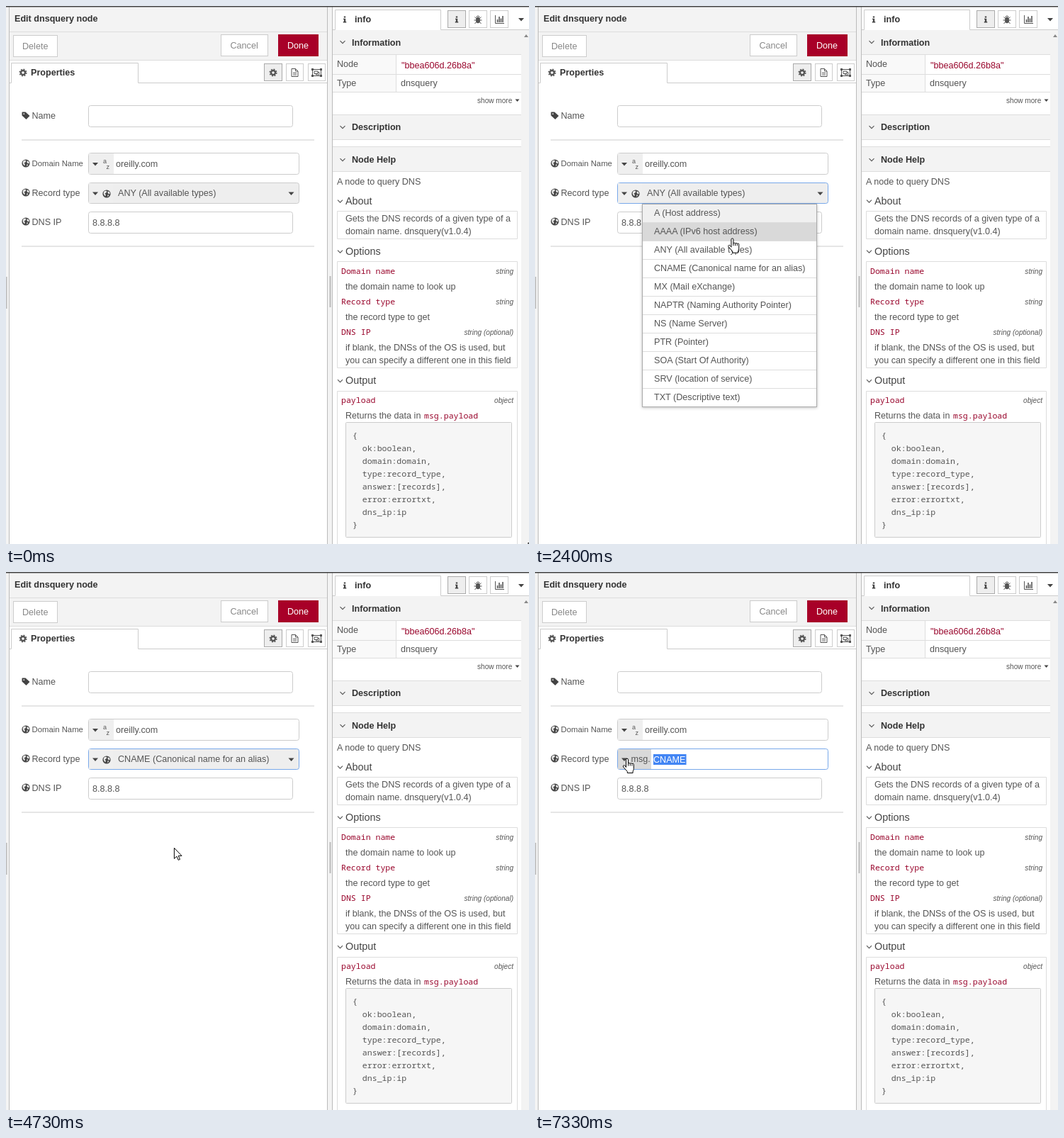
An HTML page for the animation above (8000 ms loop, 738 by 759 pixels).

```html
<!DOCTYPE html>
<html lang="en">
<head>
<meta charset="utf-8">
<title>Edit dnsquery node</title>
<style>
html, body { margin: 0; width: 100%; height: 100%; overflow: hidden; background: #fff; }
body { position: relative; font: 12.6px "Liberation Sans", Arial, sans-serif; color: #555; }
svg.layer { position: absolute; left: 0; top: 0; pointer-events: none; }
text { fill: #555; white-space: pre; }
.b { font-weight: bold; fill: #333; }
.h { font-size: 14.4px; fill: #444; }
.i { font-size: 10.08px; font-style: italic; text-anchor: end; }
.m { font: 11.55px "Noto Sans Mono", monospace; }
.red { fill: #99062c; }
.line { stroke: #ddd; fill: none; }
.rule { stroke: #ccc; fill: none; }
.bar { fill: #f3f3f3; }
.box { fill: #fff; stroke: #ccc; }
.on { fill: #eee; stroke: #aaa; }
.chev { fill: none; stroke: #555; stroke-width: 1.1; }
.menu { position: absolute; top: 279px; box-sizing: border-box; overflow: hidden; background: #fff;
  border: 1px solid #aaa; box-shadow: 0 1px 4px rgba(0,0,0,.25); }
.menu div { height: 25px; line-height: 25px; padding-left: 16px; border-bottom: 1px solid #ddd; white-space: nowrap; }
.menu .tall { height: 27px; line-height: 27px; }
.menu .icon { padding-left: 5px; }
.menu .icon > :first-child { display: inline-block; width: 16px; height: 12px; line-height: 12px; vertical-align: -2px; }
.menu .icon > b { vertical-align: 0; }
.menu .first { background: #f0f0f0; }
.menu .hover { background: #d9d9d9; }
</style>
</head>
<body>
<svg class="layer" width="738" height="759">
  <defs>
    <g id="globe">
      <circle r="5.6" fill="#444"/>
      <path d="M-3.6-3.4L-1-4.6 .4-3.2-.8-1.4-2.6-.4-1.2 1-1.8 3.6-3.6 1.6-4.4-.8ZM1.6-3.8L4.2-2.4 4.6 0 3 .2 1.6-1.2ZM1.2 1.4L3.4 1.6 1.6 4.4Z" fill="#eee"/>
    </g>
    <path id="caret" d="M-4-2H4L0 2.4Z" fill="#444"/>
    <path id="chev" class="chev" d="M-3.5-1.8L0 1.7 3.5-1.8"/>
    <g id="gear" fill="none" stroke="#555">
      <circle r="3" stroke-width="2.4"/>
      <circle r="4.7" stroke-width="1.7" stroke-dasharray="1.85 1.84"/>
    </g>
    <g id="info" fill="#444"><path d="M-1.2-4.5H1.2V-2.5H-1.2ZM-2-1.3H1.2V3H2.2V4.5H-2.2V3H-1.2V0H-2Z"/></g>
  </defs>

  <!-- editor frame -->
  <rect class="bar" width="5" height="759"/>
  <rect class="bar" x="5" width="448" height="77"/>
  <rect class="bar" x="453" width="8" height="759"/>
  <path d="M4.5 0V759M453.5 0V759M460.5 0V759" stroke="#bbb"/>
  <path d="M.5 382V427M457.5 381V425" stroke="#bbb" stroke-width="2"/>
  <path class="line" d="M5 36.5H453M5 76.5H453"/>
  <path d="M5 108.5H7.5V80.5H186.5V108.5H453" class="rule"/>
  <text class="b" x="12" y="22">Edit dnsquery node</text>
  <rect class="box" x="10.5" y="41.5" width="62" height="30"/>
  <rect class="box" x="303.5" y="40.5" width="66" height="30"/>
  <rect x="384" y="40" width="57" height="31" fill="#a80028"/>
  <text x="23" y="61" style="fill:#888">Delete</text>
  <text x="316.5" y="60" style="fill:#888">Cancel</text>
  <text x="397" y="60" style="fill:#fff">Done</text>
  <use href="#gear" x="24" y="94"/>
  <text class="b" x="35" y="98">Properties</text>
  <rect class="on" x="364.5" y="81.5" width="25" height="24"/>
  <rect class="box" x="395.5" y="81.5" width="24" height="24"/>
  <rect class="box" x="426.5" y="81.5" width="24" height="24"/>
  <use href="#gear" x="377" y="94"/>
  <path d="M403 88.5H408.5L412 92V99.5H403ZM408.5 88.5V92H412M405 94.5H410M405 97H410" fill="none" stroke="#555"/>
  <path d="M432.5 89.5H444.5V98.5H432.5ZM435 92H440V95.5H435ZM437.5 95.5V97H442V93.5H440" fill="none" stroke="#555"/>
  <path d="M431 88h3v3h-3zM443 88h3v3h-3zM431 97h3v3h-3zM443 97h3v3h-3z" fill="#555"/>

  <!-- form -->
  <path d="M22.5 150V154.5L28.5 160 33.5 155 27.5 149.5H23ZM24.5 151.5h1.6v1.6h-1.6Z" fill="#444" fill-rule="evenodd"/>
  <text x="36.5" y="159">Name</text>
  <rect class="box" x="116.5" y="140.5" width="288" height="30" rx="3"/>
  <path class="rule" d="M22 189H435M22 339H435"/>
  <use href="#globe" x="28" y="222"/><use href="#globe" x="28" y="263"/><use href="#globe" x="28" y="304"/>
  <text x="36.5" y="226" style="font-size:11.34px">Domain Name</text>
  <text x="36.5" y="268">Record type</text>
  <text x="36.5" y="309">DNS IP</text>
  <rect class="box" x="116.5" y="207.5" width="297" height="30" rx="3"/>
  <path d="M117 208H152V237H117Z" fill="#efefef"/>
  <use href="#caret" x="126" y="223"/>
  <text x="137" y="221.5" style="font-size:9px">a</text>
  <text x="141.5" y="230" style="font-size:9px">z</text>
  <text x="155" y="227">oreilly.com</text>
  <rect class="box" x="116.5" y="290.5" width="288" height="30" rx="3"/>
  <text x="122" y="310">8.8.8.8</text>

  <!-- record type control -->
  <rect id="field" x="116.5" y="249.5" width="297" height="29" rx="3"/>
  <rect id="left" x="117" y="250" height="28"/>
  <rect id="right" x="392" y="250" width="21" height="28" fill="#d9d9d9"/>
  <use href="#caret" x="126" y="264.5"/>
  <g id="chosen">
    <use href="#globe" x="142" y="265"/>
    <use href="#caret" x="402.5" y="264.5"/>
    <text id="value" x="158" y="268"></text>
  </g>
  <g id="typed">
    <text x="135.5" y="268">msg.</text>
    <text id="word" x="167" y="269">CNAME</text>
    <clipPath id="cut"><rect id="cutBox" y="257" height="15"/></clipPath>
    <g clip-path="url(#cut)">
      <rect x="160" y="257" width="60" height="15" fill="#4285f4"/>
      <text x="167" y="269" style="fill:#fff">CNAME</text>
    </g>
    <path id="bar" d="M213.5 257V272" stroke="#222"/>
  </g>

  <!-- sidebar -->
  <path class="rule" d="M461 33.5H464.5V5.5H613.5V33.5H738"/>
  <use href="#info" x="478" y="19"/>
  <text class="b" x="492" y="23">info</text>
  <rect class="on" x="623.5" y="6.5" width="25" height="24"/>
  <rect class="box" x="653.5" y="6.5" width="25" height="24"/>
  <rect class="box" x="683.5" y="6.5" width="25" height="24"/>
  <use href="#info" x="636" y="19"/>
  <ellipse cx="666" cy="20" rx="3" ry="4.3" fill="#555"/>
  <path d="M664 16a2 2 0 0 1 4 0M660.5 20H671.5M661.5 15.5L664 18M670.5 15.5L668 18M661.5 25L664 22M670.5 25L668 22" fill="none" stroke="#555"/>
  <path d="M690.5 13V24.5H703" fill="none" stroke="#555"/>
  <path d="M693.5 23V19M696 23V15M698.5 23V17.5M701 23V14" stroke="#555" stroke-width="1.6"/>
  <use href="#caret" x="727" y="19"/>
  <rect class="bar" x="727" y="34" width="11" height="725"/>
  <path d="M731 44H737L734 40Z" fill="#888"/>
  <rect class="bar" x="461" y="34" width="266" height="34"/>
  <rect class="bar" x="461" y="153" width="266" height="35"/>
  <rect class="bar" x="461" y="198" width="266" height="35"/>
  <rect x="461" y="69" width="89" height="52" fill="#f9f9f9"/>
  <path class="line" d="M461 68.5H727M461 96.5H727M461 121.5H727M550.5 69V121M461 153.5H727M461 188.5H727M461 198.5H727M461 233.5H727"/>
  <use href="#chev" x="475" y="51"/><use href="#chev" x="475" y="171"/><use href="#chev" x="475" y="217"/>
  <text class="b" x="488" y="55.5">Information</text>
  <text class="b" x="488" y="175">Description</text>
  <text class="b" x="488" y="221">Node Help</text>
  <text x="467" y="85.5">Node</text><text class="red" x="558" y="88">"bbea606d.26b8a"</text>
  <text x="467" y="113">Type</text><text x="557" y="113">dnsquery</text>
  <text x="665" y="136.5" style="font-size:10.08px">show more</text>
  <path d="M718.5 131.5H724.5L721.5 135Z" fill="#444"/>
  <text x="467" y="252">A node to query DNS</text>
  <use href="#chev" x="471.5" y="275.5"/><use href="#chev" x="471.5" y="346.5"/><use href="#chev" x="471.5" y="529"/>
  <text class="h" x="479" y="280">About</text>
  <text class="h" x="479" y="351">Options</text>
  <text class="h" x="479" y="533">Output</text>
  <path class="line" d="M467.5 289.5H721.5V328.5H467.5ZM467.5 360.5H721.5V510.5H467.5ZM467.5 760V543.5H721.5V760"/>
  <text x="479" y="304">Gets the DNS records of a given type of a</text>
  <text x="479" y="321.5">domain name. dnsquery(v1.0.4)</text>
  <text class="m red" x="473" y="378">Domain name</text><text class="i" x="716" y="378">string</text>
  <text x="479" y="399.5">the domain name to look up</text>
  <text class="m red" x="473" y="421">Record type</text><text class="i" x="716" y="421">string</text>
  <text x="479" y="443">the record type to get</text>
  <text class="m red" x="473" y="464">DNS IP</text><text class="i" x="716" y="464">string (optional)</text>
  <text x="479" y="486">if blank, the DNSs of the OS is used, but</text>
  <text x="479" y="504">you can specify a different one in this field</text>
  <text class="m red" x="473" y="560">payload</text><text class="i" x="716" y="560">object</text>
  <text x="479" y="582">Returns the data in</text>
  <text class="m red" x="590" y="582">msg.payload</text>
  <rect x="479.5" y="587.5" width="234" height="162" fill="#f6f6f6" stroke="#ccc" rx="1"/>
  <g id="code"></g>
  <rect width="738" height="1.5" fill="#444"/>
</svg>

<div class="menu" id="records" style="left:151px;width:247px"></div>
<div class="menu" id="types" style="left:116px;width:111px"></div>

<svg class="layer" width="738" height="759">
  <g id="pointer" stroke-linejoin="round">
    <path data-kind="arrow" d="M0 0V15L3.5 11.8 5.8 17 8.1 16 5.8 11H10.6Z" fill="#fff" stroke="#000"/>
    <g data-kind="hand" transform="translate(-6.5 -.5)" stroke="#000" fill="#fff">
      <path d="M5 13V2.2Q5 .7 6.5 .7T8 2.2V8q0-1 1.3-1t1.4 1.2q0-.9 1.3-.9t1.4 1.2q0-.8 1.2-.8t1.2 1.3V15q0 2-1.2 3.6V21H6.8V19L1.2 12.6Q.3 11 1.6 10.3T4 11.5Z"/>
      <path d="M8 8V11M10.7 8.5V11M13.4 9V11" fill="none"/>
    </g>
    <path data-kind="beam" d="M-3-7H-1Q0-7 0-6Q0-7 1-7H3M0-6V6M-3 7H-1Q0 7 0 6Q0 7 1 7H3" fill="none" stroke="#222" stroke-width="1.1"/>
  </g>
</svg>

<script>
const $ = id => document.getElementById(id);
const LOOP = 8000, STEP = 1000 / 15, TEXT_END = 213.5;

// pointer stops: time, x, y
const path = [
  [67, 737, 757], [400, 225, 396], [533, 225, 396], [870, 303, 329],
  [1003, 303, 329], [1400, 295.5, 261], [1933, 295.5, 261], [2600, 274, 345],
  [2933, 274, 345], [3066, 273.5, 337.5], [3200, 272, 327], [3333, 272, 327],
  [3930, 265.5, 375.5], [4600, 265.5, 375.5], [4800, 228, 394], [5066, 80, 320],
  [5330, 127.5, 266], [5866, 127.5, 266], [6130, 136, 309], [6270, 136, 309],
  [6466, 137, 317], [7000, 234, 264], [7066, 234, 264], [7330, 130, 263]
];

const records = ["A (Host address)", "AAAA (IPv6 host address)", "ANY (All available types)",
  "CNAME (Canonical name for an alias)", "MX (Mail eXchange)", "NAPTR (Naming Authority Pointer)",
  "NS (Name Server)", "PTR (Pointer)", "SOA (Start Of Authority)", "SRV (location of service)",
  "TXT (Descriptive text)"];
const globe = '<svg><use href="#globe" x="5.5" y="6"/></svg>';

$("records").innerHTML = records.map(r => `<div>${r}</div>`).join("");
$("types").innerHTML = `<div class="icon">${globe}Record Type</div>` +
  ["msg.", "flow.", "global."].map(s => `<div>${s}</div>`).join("") +
  '<div class="icon tall"><b>J:</b>expression</div><div class="icon tall"><b>$</b>env variable</div>';
$("code").innerHTML = ["{", "  ok:boolean,", "  domain:domain,", "  type:record_type,",
  "  answer:[records],", "  error:errortxt,", "  dns_ip:ip", "}"]
  .map((s, i) => `<text class="m" x="489" y="${610 + 18 * i}">${s}</text>`).join("");

const swing = p => .5 - Math.cos(Math.PI * Math.min(1, Math.max(0, p))) / 2;
const within = (p, x0, y0, x1, y1) => p.x >= x0 && p.x < x1 && p.y >= y0 && p.y < y1;
const show = (el, yes) => { el.style.display = yes ? "" : "none"; };

function pointerAt(t) {
  const n = path.findIndex(k => k[0] > t);
  const [t1, x1, y1] = path[n < 0 ? path.length - 1 : n];
  const [t0, x0, y0] = path[n < 0 ? path.length - 1 : Math.max(0, n - 1)];
  const p = t1 > t0 ? swing((t - t0) / (t1 - t0)) : 1;
  return { x: x0 + (x1 - x0) * p, y: y0 + (y1 - y0) * p };
}

// Slides a menu open and marks its rows; returns whether the pointer is on it.
function drawMenu(el, t, open, close, full, pt) {
  const shown = t >= open && t < close;
  show(el, shown);
  if (!shown) return false;
  const p = (t - open) / 200;
  el.style.height = Math.max(2, full * swing(p)) + "px";
  const x = el.offsetLeft, on = within(pt, x, 279, x + el.offsetWidth, 279 + full);
  const row = on ? Math.floor((pt.y - 279) / 26) : -1;
  [...el.children].forEach((r, i) => {
    r.classList.toggle("first", i === 0 && p >= 1);
    r.classList.toggle("hover", i === row);
  });
  return on;
}

function draw(t) {
  const pt = pointerAt(t);
  const typed = t >= 6260, drag = t > 7080 && t < 7300;
  const onMenu = drawMenu($("records"), t, 1440, 4390, 287, pt) |
    drawMenu($("types"), t, 5422, 6260, 161, pt);
  const onField = !onMenu && within(pt, 116, 249, 414, 279);
  const split = typed ? 164 : 151;
  const onLeft = onField && !drag && pt.x < split;

  const focus = t >= 1440;
  $("field").setAttribute("stroke", focus ? "#78a8ea" : "#ccc");
  $("field").setAttribute("fill", typed ? "#fff" : "#eee");
  $("left").setAttribute("width", split - 117);
  $("left").setAttribute("fill", onLeft ? "#d9d9d9" : "#efefef");
  $("left").setAttribute("stroke", !typed && t >= 5422 ? "#9ab4d8" : "none");
  show($("right"), onField && !onLeft && !typed);
  show($("chosen"), !typed);
  show($("typed"), typed);
  $("value").textContent = records[t < 4390 ? 2 : 3];

  if (typed) {
    let n = 5;
    if (t > 7080) for (n = 0; n < 5 && $("word").getEndPositionOfChar(n).x - 4 < pt.x;) n++;
    const from = n < 5 ? $("word").getStartPositionOfChar(n).x : TEXT_END;
    $("cutBox").setAttribute("x", from);
    $("cutBox").setAttribute("width", TEXT_END - from);
    const since = t - (t < 6990 ? 6260 : 6990);
    show($("bar"), n === 5 && since % 1060 < 530);
  }

  const onInput = within(pt, 116, 140, 405, 171) || within(pt, 116, 290, 405, 321) ||
    within(pt, 152, 208, 414, 238);
  let kind = "arrow";
  if (drag || (typed && onField && !onLeft)) kind = "beam";
  else if (onMenu || onField || (t >= 4390 && t < 4460)) kind = "hand";
  else if (onInput) kind = "beam";
  for (const el of $("pointer").children) show(el, el.dataset.kind === kind);
  $("pointer").setAttribute("transform", `translate(${pt.x} ${pt.y})`);
}

const start = performance.now();
function tick() {
  const t = (performance.now() - start) % LOOP;
  draw(Math.floor((t + 4) / STEP) * STEP);
  requestAnimationFrame(tick);
}
tick();
</script>
</body>
</html>
```
